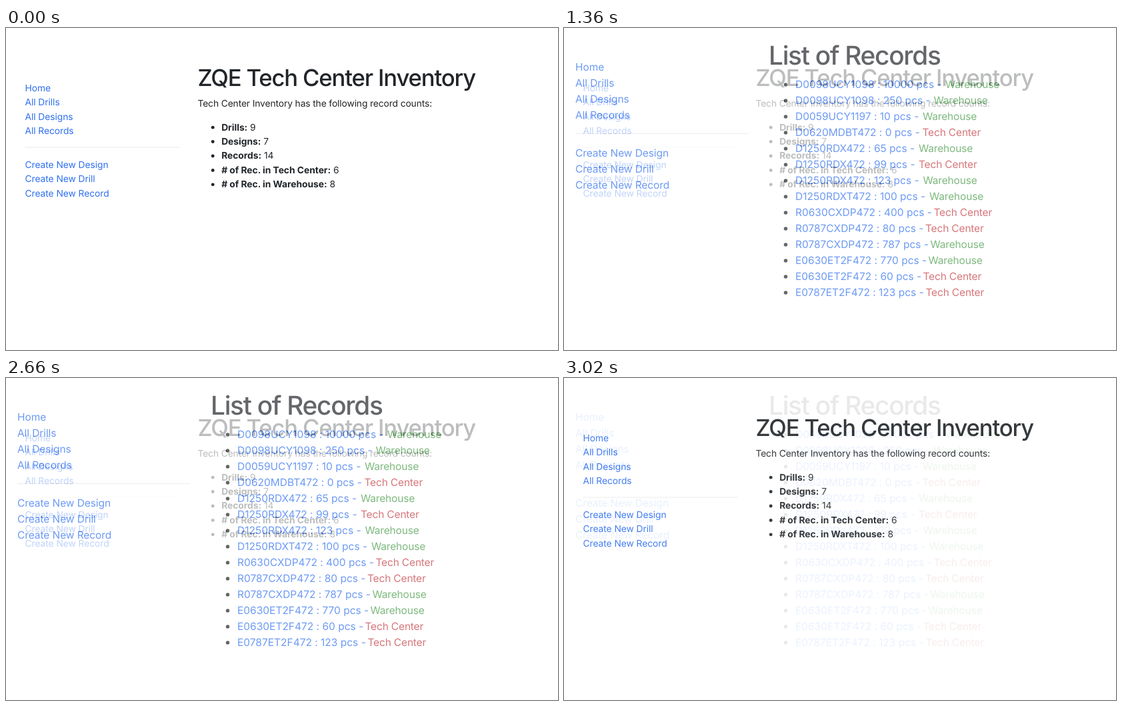
Write an HTML page that moves like this. It is 828 by 483 pixels and loops after 3080 ms.

```html
<!DOCTYPE html>
<html lang="en">
<head>
<meta charset="utf-8">
<title>Inventory</title>
<style>
  html, body { margin: 0; width: 100%; height: 100%; overflow: hidden; background: #fff; }
  svg { display: block; }
  text {
    font: 400 15.5px Inter, Roboto, sans-serif;
    font-optical-sizing: none;
    font-feature-settings: "calt" 0;
    text-rendering: geometricPrecision;
    white-space: pre;
    fill: #212529;
  }
  .title { font-size: 38.8px; font-weight: 500; letter-spacing: -1.3px; }
  .lead { letter-spacing: -.15px; }
  .bold { font-weight: 700; letter-spacing: -.05px; }
  .link { fill: #2e6ff0; }
  .nav { letter-spacing: -.08px; }
  .place { letter-spacing: -.17px; }
  .warehouse { fill: #469b47; }
  .center { fill: #c53c43; }
  circle { fill: #212529; }
  .rule { fill: #000; fill-opacity: .1; }

  /* crossfade in hard steps of a tenth, 60 ms each */
  #records { animation: fade 3080ms infinite; }
  @keyframes fade {
    0% { opacity: 0; animation-timing-function: step-end; }
    32.467% { opacity: 0; animation-timing-function: steps(10, start); }
    51.948% { opacity: 1; animation-timing-function: step-end; }
    82.467% { opacity: 1; animation-timing-function: steps(9, start); }
    100% { opacity: .1; }
  }
</style>
</head>
<body>
<svg width="828" height="483" viewBox="0 0 828 483">
  <g id="home" transform="translate(13.3 37.5) scale(.893)"></g>
  <g id="records"><rect width="828" height="483" fill="#fff"/></g>
</svg>
<script>
  const LINE = 24;
  const NAV_X = 17, MAIN_X = 307, LIST_X = 347;

  const text = (x, y, cls, body) => `<text x="${x}" y="${y}" class="${cls}">${body}</text>`;
  const bullet = y => `<circle cx="332.5" cy="${y - 5}" r="2.75"/>`;
  const lines = (items, y, draw) => items.map((item, i) => draw(item, y + i * LINE)).join("");

  const navLink = (label, y) => text(NAV_X, y, "link nav", label);
  const nav =
    lines(["Home", "All Drills", "All Designs", "All Records"], 64, navLink) +
    `<rect class="rule" x="${NAV_X}" y="158" width="260" height="1"/>` +
    lines(["Create New Design", "Create New Drill", "Create New Record"], 193, navLink);

  const page = (id, title, main) => {
    document.getElementById(id).innerHTML += nav + text(MAIN_X, 55, "title", title) + main;
  };

  const counts = [
    ["Drills", 9], ["Designs", 7], ["Records", 14],
    ["# of Rec. in Tech Center", 6], ["# of Rec. in Warehouse", 8]
  ];
  page("home", "ZQE Tech Center Inventory",
    text(MAIN_X, 90, "lead", "Tech Center Inventory has the following record counts:") +
    lines(counts, 130, ([label, n], y) =>
      bullet(y) + text(LIST_X, y, "", `<tspan class="bold">${label}:</tspan> ${n}`)));

  // code, pieces, place (W or T), left edge of the place
  const records = [
    ["D0098UCY1098", 10000, "W", 572],
    ["D0098UCY1098", 250, "W", 554.5],
    ["D0059UCY1197", 10, "W", 538],
    ["D0620MDBT472", 0, "T", 537.5],
    ["D1250RDX472", 65, "W", 532],
    ["D1250RDX472", 99, "T", 532],
    ["D1250RDX472", 123, "W", 538.5],
    ["D1250RDXT472", 100, "W", 548],
    ["R0630CXDP472", 400, "T", 554.5],
    ["R0787CXDP472", 80, "T", 542],
    ["R0787CXDP472", 787, "W", 549.5],
    ["E0630ET2F472", 770, "W", 546.5],
    ["E0630ET2F472", 60, "T", 538.5],
    ["E0787ET2F472", 123, "T", 542.5]
  ];
  const places = { W: ["warehouse", "Warehouse"], T: ["center", "Tech Center"] };
  page("records", "List of Records",
    lines(records, 90, ([code, n, place, x], y) => {
      const [cls, name] = places[place];
      return bullet(y) + text(LIST_X, y, "link", `${code} : ${n} pcs -`) + text(x, y, "place " + cls, name);
    }));
</script>
</body>
</html>
```
